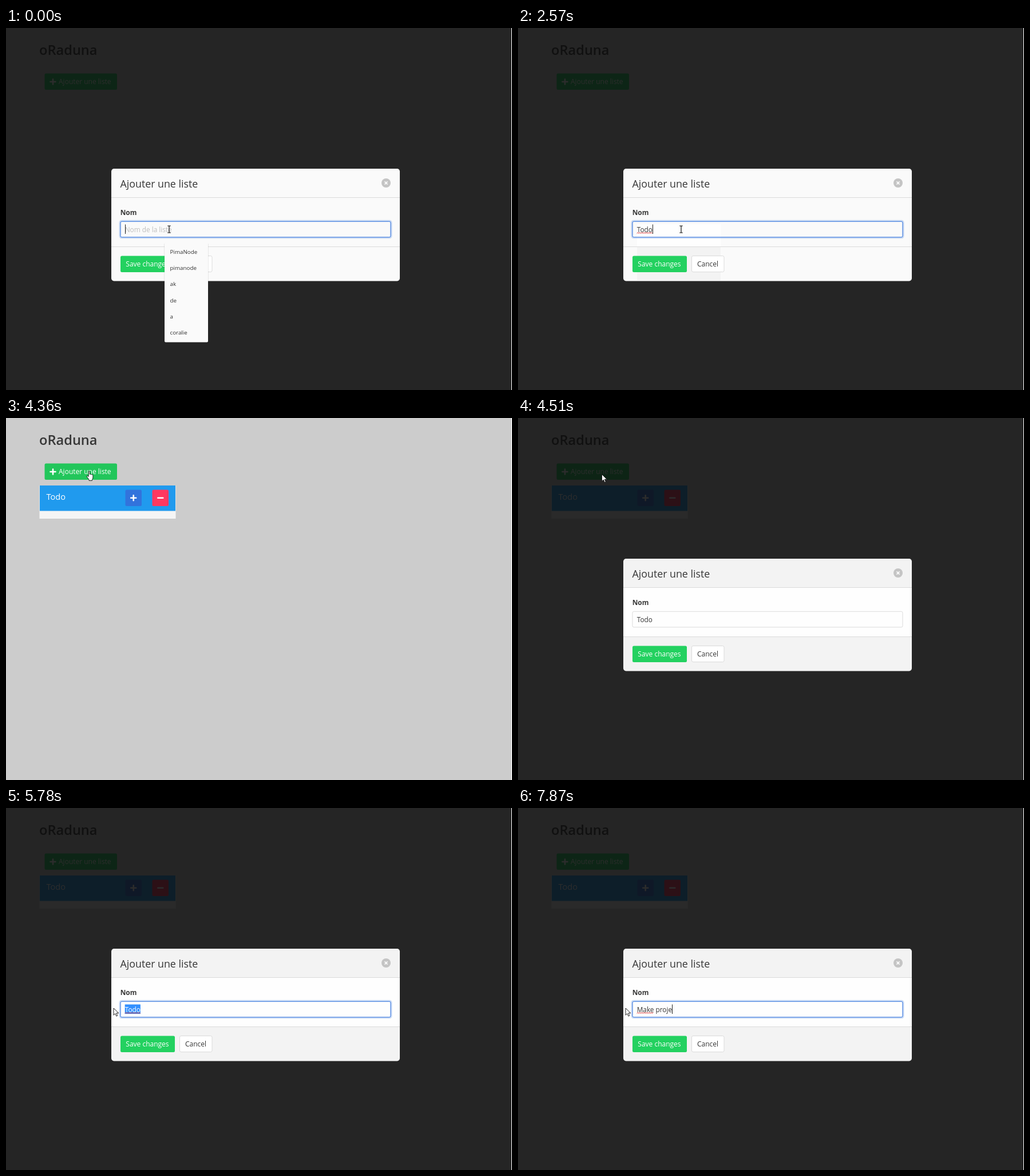
An HTML page for the animation above (7.99 s loop, 884 px wide and 633 px high).

```html
<!DOCTYPE html>
<html lang="fr">
<head>
<meta charset="utf-8">
<title>Kanban</title>
<style>
  html, body { margin: 0; width: 100%; height: 100%; overflow: hidden; background: #ccc; }
  svg { display: block; width: 884px; height: 633px; }
  text { font-family: "Open Sans", "Noto Sans", sans-serif; font-size: 12px; fill: #363636; white-space: pre; }
  .h1 { font-size: 23.6px; font-weight: 600; }
  .h2 { font-size: 17.8px; }
  .card { font-size: 14.6px; }
  .label { font-size: 11.9px; font-weight: 700; }
  .field { font-size: 11.8px; }
  .menu text { font-size: 9.8px; fill: #333; }
  .white { fill: #fff; }
  .hint { fill: #363636; fill-opacity: .3; }
  .icon { stroke: #fff; stroke-width: 2.6; stroke-linecap: round; fill: none; }
  .rule { stroke: #dbdbdb; fill: none; }
</style>
</head>
<body>
<svg viewBox="0 0 884 633" xmlns="http://www.w3.org/2000/svg">
  <rect width="884" height="633" fill="#ccc"/>
  <text class="h1" x="58" y="47">oRaduna</text>
  <rect id="add" x="67.5" y="79.5" width="126.5" height="28.5" rx="2.5"/>
  <path class="icon" d="M77.5 94h9M82 89.500v9"/>
  <text class="white" x="92" y="98.300">Ajouter une liste</text>

  <g id="list">
    <rect x="58.500" y="118" width="238" height="58" fill="#f5f5f5"/>
    <rect x="59" y="118" width="237" height="44.500" fill="#209aee"/>
    <text class="card white" x="70.500" y="143">Todo</text>
    <rect x="208.500" y="125.500" width="28.500" height="28.500" rx="2.500" fill="#3273dc"/>
    <rect x="255.500" y="125.500" width="28.500" height="28.500" rx="2.500" fill="#ff3860"/>
    <path class="icon" d="M218.200 139.700h9M222.700 135.200v9M265.300 139.700h9"/>
  </g>

  <g id="modal">
    <rect width="884" height="633" fill="#0a0a0a" fill-opacity=".86"/>
    <rect id="sheet" x="184" y="246" width="504" height="196.500" rx="4.700"/>
    <rect id="main" x="184" y="297" width="504" height="85"/>
    <g id="patch">
      <rect x="208" y="343" width="146" height="39" fill="#fefefe"/>
      <rect x="208" y="383" width="146" height="58" fill="#f3f3f3"/>
    </g>
    <path class="rule" d="M184 296.500H688M184 382.500H688"/>
    <text class="h2" x="199.500" y="278.700">Ajouter une liste</text>
    <circle cx="664" cy="271" r="8" fill="#c4c4c4"/>
    <path d="M661.500 268.500l5 5m0-5l-5 5" stroke="#fff" stroke-width="1.700"/>
    <text class="label" x="199.700" y="326.700">Nom</text>
    <rect id="glow" x="199" y="337.300" width="474" height="29.500" rx="3" fill="none" stroke="#3273dc" stroke-opacity=".25" stroke-width="3"/>
    <rect id="box" x="200" y="338.300" width="472" height="27.500" rx="2.500" fill="none"/>
    <rect id="sel" y="343.500" height="16.500" fill="#3390ff"/>
    <text id="hint" class="field hint" x="207.700" y="356.500">Nom de la liste</text>
    <text id="value" class="field" x="207.700" y="356.500"></text>
    <path id="wave" fill="none" stroke="#e23a3a" stroke-width=".9"/>
    <rect id="caret" y="343.500" width="1" height="16.500" fill="#222"/>
    <rect x="200" y="398.500" width="95" height="28.500" rx="2.500" fill="#23d160"/>
    <text class="white" x="209.300" y="417">Save changes</text>
    <rect x="303.500" y="398.500" width="56.500" height="28" rx="2.500" fill="#fff" stroke="#dbdbdb"/>
    <text x="313" y="417">Cancel</text>
    <g id="menu" class="menu"></g>
  </g>

  <g id="cursor">
    <path id="arrow" d="M.5 .5V12.700l2.900-2.700 1.900 4.500 2-.9-1.900-4.400h3.900z" fill="#fff" stroke="#111" stroke-width=".9"/>
    <path id="beam" d="M-2.800-6h2.200L0-5.400 .6-6h2.200M0-5.400V5.400M-2.800 6h2.200L0 5.400 .6 6h2.200" fill="none" stroke="#111" stroke-width="1.200"/>
    <path id="hand" d="M3.700 10V1.600q0-1.200 1.100-1.200t1.100 1.200V6q1-.8 1.900.2q1.100-.6 1.900.4q1.700-.3 1.700 1.300v3.600q0 2.400-1.500 3.700v1.800H4.600v-1.600L.8 10.200q-.6-1.300.6-1.700q1.200 0 2.300 1.500z" fill="#fff" stroke="#111" stroke-width=".9"/>
  </g>
  <rect x="883" width="1" height="633" fill="#fff"/>
</svg>
<script>
const LOOP = 7990, LEFT = 207.7;
const $ = id => document.getElementById(id);
const set = (id, attrs) => { for (const k in attrs) $(id).setAttribute(k, attrs[k]); };
const show = (id, on) => $(id).setAttribute('visibility', on ? 'inherit' : 'hidden');
const within = (t, a, b) => t >= a && t < b;

// Each track lists [time, ...values]; the latest passed entry applies.
const at = (track, t) => track.filter(e => e[0] <= t).pop().slice(1);

const pointer = [
  [0, 'beam', 285, 352], [2720, 'arrow', 283.5, 351], [3570, ''],
  [4000, 'arrow', 270, 95], [4120, 'arrow', 208, 89], [4240, 'hand', 165, 87],
  [4360, 'hand', 140.5, 92.5], [4510, 'arrow', 146, 98], [4640, 'arrow', 160, 132],
  [4760, 'arrow', 199, 230], [4880, 'arrow', 234, 325], [5000, 'beam', 241, 353],
  [5270, 'beam', 221, 354], [5400, 'arrow', 192, 357],
  [5660, 'arrow', 189, 352], [5780, 'arrow', 187.5, 349.500]
];
const typed = [
  [0, ''], [150, 'T'], [270, 'To'], [420, 'Todo'],
  [6430, 'M'], [6550, 'Ma'], [6670, 'Mak'], [6800, 'Make'], [7070, 'Make '],
  [7360, 'Make p'], [7480, 'Make pr'], [7630, 'Make pro'], [7750, 'Make proj'], [7870, 'Make proje']
];
const menus = [
  [0, 76, 1, 'PimaNode', 'pimanode', 'ak', 'de', 'a', 'coralie'],
  [150, 76, 1, 'Todo'], [420, 76, .4, 'Todo'], [570, 0, 0],
  [6430, 132, 1, 'coralie', 'Make projet demo'],
  [6550, 132, 1, 'Make projet demo'], [6920, 0, 0]
];
const carets = [
  [0, 1], [970, 0], [1530, 1], [2030, 0], [2570, 1], [2720, 0],
  [5150, 1], [5270, 0], [6430, 1]
];

function drawMenu([width, alpha, ...items]) {
  const h = 4 + items.length * 28.4;
  const rows = items.map((s, i) => `<text x="286.500" y="${394.5 + i * 28.35}">${s}</text>`);
  $('menu').innerHTML = items.length ?
    `<rect x="276.500" y="376" width="${width + 1}" height="${h}" rx="2" fill="#000" opacity=".15"/>` +
    `<rect x="277" y="375" width="${width}" height="${h}" rx="2" fill="#fafafa"/>` + rows.join('') : '';
  set('menu', { opacity: alpha });
}

function drawField(t) {
  const [text] = at(typed, t), value = $('value');
  const focus = t < 2720 || t >= 5150;
  value.textContent = text;
  const width = text ? value.getComputedTextLength() : 0;
  const part = within(t, 5270, 5400) ? .5 : within(t, 5400, 6430) ? 1 : 0;
  show('hint', !text);
  show('glow', focus);
  set('box', { stroke: focus ? '#3273dc' : '#dbdbdb' });
  set('sel', { x: LEFT + width * (1 - part), width: width * part });
  value.style.fill = part === 1 ? '#fff' : '';
  show('caret', at(carets, t)[0]);
  set('caret', { x: Math.round(LEFT + width - .2) });

  const marked = within(t, 1530, 2720) || within(t, 5150, 6430) || t >= 7070;
  let d = '';
  if (marked) {
    const len = value.getSubStringLength(0, 4);
    for (let x = 0; x <= len; x += 1.5) d += `${x ? 'L' : 'M'}${LEFT + x} ${x % 3 ? 357.5 : 359.3}`;
  }
  set('wave', { d });
}

function drawPointer([kind, x = 0, y = 0]) {
  for (const id of ['arrow', 'beam', 'hand']) show(id, id === kind);
  set('cursor', { transform: `translate(${x} ${y})` });
}

function draw(t) {
  const modal = t < 2720 || t >= 4510, first = t < 2720;
  set('add', { fill: within(t, 4120, 4640) ? '#22c65b' : '#23d160' });
  show('list', !first);
  $('modal').style.display = modal ? '' : 'none';
  set('sheet', { fill: first ? '#fafafa' : '#f3f3f3' });
  set('main', { fill: first ? '#fafafa' : '#fefefe' });
  show('patch', within(t, 150, 2720));
  if (modal) {
    drawField(t);
    drawMenu(at(menus, t));
  }
  drawPointer(at(pointer, t));
}

const tracks = [pointer, typed, menus, carets];
const marks = [...new Set([...tracks.flat().map(e => e[0]), 4510, 5150, 7070])].sort((a, b) => a - b);
let start, last = -1;
function tick(now) {
  start ??= now;
  const t = (now - start) % LOOP;
  const mark = marks.filter(m => m <= t).pop();
  if (mark !== last) draw(last = mark);
  requestAnimationFrame(tick);
}
draw(0);
requestAnimationFrame(tick);
</script>
</body>
</html>
```
